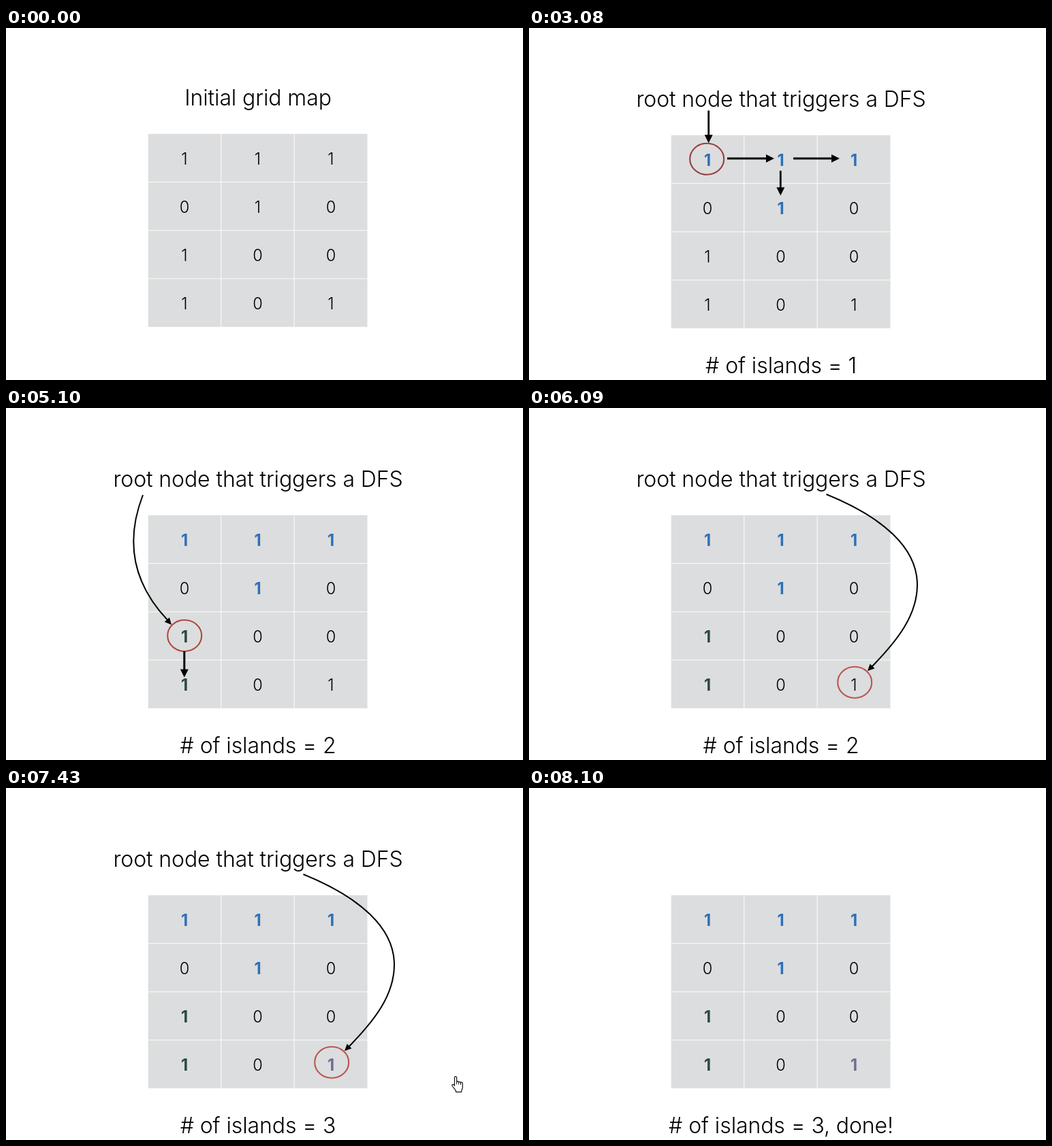
These frames come from a looping animation (759x518 px, 8.82 s). An HTML page:

```html
<!DOCTYPE html>
<html lang="en">
<head>
<meta charset="utf-8">
<title>Counting islands with DFS</title>
<style>
  html, body { margin: 0; width: 100%; height: 100%; overflow: hidden; background: #fff; }
  svg { display: block; width: 759px; height: 518px; }
  text {
    font-family: Inter, "Liberation Sans", Arial, sans-serif;
    font-weight: 300; font-optical-sizing: none; text-anchor: middle;
  }
  .label { font-size: 32px; letter-spacing: -.1px; fill: #000; }
  .digit { font-size: 23.6px; fill: #000; }
  .found { font-weight: 700; }
  .line { fill: none; stroke: #000; }
</style>
</head>
<body>
<svg id="stage" viewBox="0 0 759 518"></svg>
<script>
const LOOP = 8820;
const STARTS = [0, 2090, 3080, 4090, 5100, 6090, 7100, 8100];
const GRID = ["111", "010", "100", "101"];
const COLS = [262, 369.5, 477];
const COUNTS = [0, 0, 1, 1, 2, 2, 3, 3];
const BLUE = "#2f70b7", GREEN = "#2b4a41", PURPLE = "#6b6f95";
// row + column of each land cell: scene in which it is visited, colour
const VISITS = {
  "00": [2, BLUE], "01": [2, BLUE], "02": [2, BLUE], "11": [2, BLUE],
  "20": [4, GREEN], "30": [4, GREEN], "32": [6, PURPLE]
};
// time, left, top of the pointer
const POINTER = [
  [6700, 734, 122], [6770, 723, 137], [6830, 711, 153], [6900, 697, 169],
  [6970, 682, 187], [7040, 665, 205], [7100, 658, 232], [7170, 654, 264],
  [7230, 651, 298], [7300, 650, 334], [7370, 651, 382], [7430, 654, 424],
  [7500, 660, 451], [7560, 671, 473], [7630, 684, 489], [7700, 695, 501],
  [7760, 704, 511], [7830, 800, 600]
];

const stage = document.getElementById("stage");

function add(parent, tag, attrs, text) {
  const el = document.createElementNS("http://www.w3.org/2000/svg", tag);
  for (const k in attrs) el.setAttribute(k, attrs[k]);
  if (text !== undefined) el.textContent = text;
  parent.appendChild(el);
  return el;
}

function label(g, text, y) {
  add(g, "text", { class: "label", x: 370, y }, text);
}

function head(g, x, y, angle, len, half) {
  add(g, "path", {
    d: `M0 0L${-len} ${-half}V${half}Z`,
    transform: `translate(${x} ${y}) rotate(${angle})`
  });
}

function arrow(g, x1, y1, x2, y2, width = 2.8) {
  const angle = Math.atan2(y2 - y1, x2 - x1) * 180 / Math.PI;
  const len = Math.hypot(x2 - x1, y2 - y1);
  add(g, "path", {
    class: "line", "stroke-width": width, d: `M0 0H${len - 10}`,
    transform: `translate(${x1} ${y1}) rotate(${angle})`
  });
  head(g, x2, y2, angle, 12, 6);
}

function curve(g, d, x, y, angle) {
  add(g, "path", { class: "line", "stroke-width": 2, d });
  head(g, x, y, angle, 10, 4.8);
}

function ring(g, cx, cy, stroke) {
  add(g, "ellipse", { cx, cy, rx: 25, ry: 23, fill: "none", stroke, "stroke-width": 2.1 });
}

function drawGrid(g, scene, top) {
  add(g, "rect", { x: 208.7, y: top, width: 321.8, height: 284, fill: "#dcddde" });
  let d = `M315.7 ${top}v284M423.2 ${top}v284`;
  for (let r = 1; r < 4; r++) d += `M208.7 ${top + r * 71.1 - .2}h321.8`;
  add(g, "path", { d, fill: "none", stroke: "#f7f7f8", "stroke-width": 1.3 });
  GRID.forEach((row, r) => [...row].forEach((n, c) => {
    const visit = VISITS["" + r + c];
    const el = add(g, "text", { class: "digit", x: COLS[c], y: top + 44.8 + r * 71.2 }, n);
    if (visit && scene >= visit[0]) {
      el.classList.add("found");
      el.style.fill = visit[1];
    }
  }));
}

function drawMarks(g, scene) {
  if (scene === 1) {
    arrow(g, 263.7, 120.5, 263.7, 168.2);
    ring(g, 261.2, 192, "#683a36");
  }
  if (scene === 2) {
    arrow(g, 263.7, 121.5, 263.7, 169.2);
    ring(g, 261.2, 192.7, "#98403e");
    arrow(g, 291, 192, 360, 192);
    arrow(g, 388, 192, 456, 192);
    arrow(g, 369.3, 210, 369.3, 246.5);
  }
  if (scene === 3 || scene === 4) {
    curve(g, "M201 128C177 190 182 254 238 313", 243, 319, 48);
    ring(g, 262.2, 335, "#ad4a3f");
  }
  if (scene === 4) arrow(g, 261.8, 358, 261.8, 396.5, 3);
  if (scene === 5 || scene === 6) {
    curve(g, "M436.5 127C520 161 570 206 570 260C570 305 541 342 503 381", 497, 387, 135);
    ring(g, 478.2, 403.7, "#b9564f");
  }
}

const scenes = STARTS.map((_, i) => {
  const g = add(stage, "g", {});
  const shift = Math.min(i, 2);
  const last = i === STARTS.length - 1;
  drawGrid(g, i, 155.8 + shift);
  if (!last) label(g, i ? "root node that triggers a DFS" : "Initial grid map", 114 + shift);
  if (i) label(g, `# of islands = ${COUNTS[i]}${last ? ", done!" : ""}`, 506.2 + shift);
  drawMarks(g, i);
  return g;
});

const hand = add(stage, "g", { fill: "#fff", stroke: "#111", "stroke-width": 1.2, "stroke-linejoin": "round" });
add(hand, "path", {
  d: "M4.5 14V2.2a1.6 1.6 0 0 1 3.2 0V8.6a1.5 1.5 0 0 1 2.9.2v.6a1.5 1.5 0 0 1 2.9.2v.8" +
     "a1.4 1.4 0 0 1 2.8.3v5.6c0 2.5-1.7 3.5-1.7 7H6.7c0-3-2.5-4.5-5.6-8.8c-1.2-1.8 1-3.2 2.3-1.8z"
});
add(hand, "path", { d: "M7.7 8.6v3.6M10.6 9.4v3M13.5 10.4v2.4", fill: "none", "stroke-width": 1 });

function lastBefore(times, t) {
  let n = -1;
  while (n + 1 < times.length && times[n + 1] <= t) n++;
  return n;
}

const pointerTimes = POINTER.map(p => p[0]);
const origin = performance.now();

function draw(now) {
  const t = Math.max(0, now - origin) % LOOP;
  const scene = lastBefore(STARTS, t);
  scenes.forEach((g, i) => g.style.display = i === scene ? "" : "none");
  const p = POINTER[lastBefore(pointerTimes, t)];
  hand.style.display = p ? "" : "none";
  if (p) hand.setAttribute("transform", `translate(${p[1]} ${p[2]})`);
  requestAnimationFrame(draw);
}
draw(origin);
</script>
</body>
</html>
```
